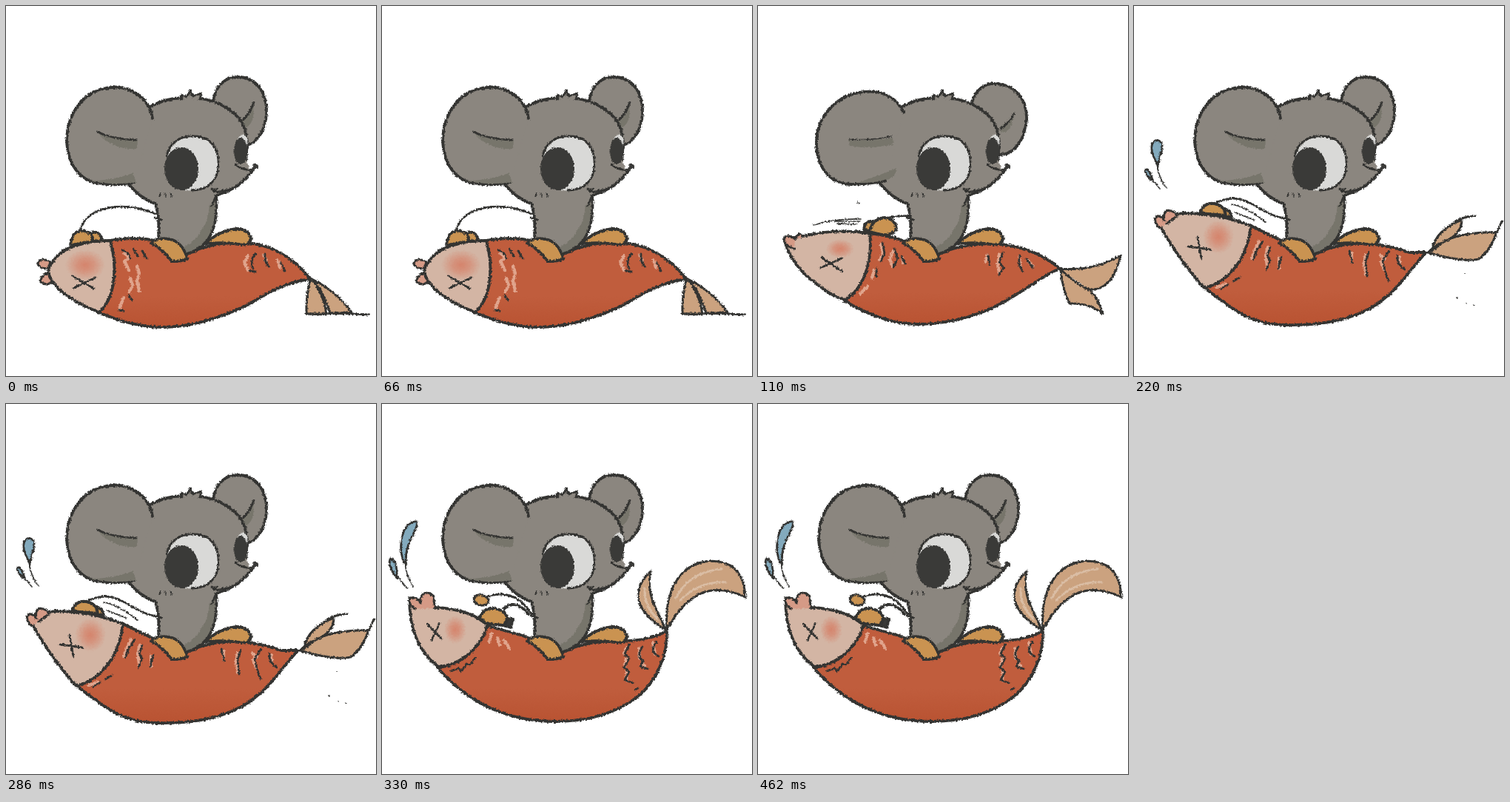
Write an HTML page that moves like this. It is 500x500 px and loops after 550 ms.

```html
<!DOCTYPE html>
<html lang="en">
<head>
<meta charset="utf-8">
<title>Mouse riding a fish</title>
<style>
  html, body { margin: 0; width: 100%; height: 100%; overflow: hidden; background: #fff; }
  svg { display: block; width: 100vw; height: 100vh; }
  path { fill: none; stroke: #343432; stroke-width: 3.8; stroke-linecap: round; stroke-linejoin: round; }
  path.thin { stroke-width: 2.8; }
  path.fine { stroke-width: 1.7; }
  path.grey { fill: #8b867f; }
  path.flat { stroke: none; }
  path.shade { fill: #77756b; stroke: none; }
  path.red { fill: url(#scales); }
  path.face { fill: #d3b5a4; }
  path.lip { fill: #d59a86; stroke-width: 3; }
  path.gold, ellipse.gold { fill: #ca9351; }
  ellipse.gold { stroke: #343432; stroke-width: 3.2; }
  path.tail { fill: #cba27f; stroke-width: 3; }
  path.drop { fill: #83aabd; stroke-width: 2.8; }
  path.mark { stroke: #e0a48c; stroke-width: 4.2; }
  path.streak { stroke: #dabda4; stroke-width: 3; }
  .ink { fill: #3a3a38; }
  .white { fill: #d9d9d7; }

  .pose, .earsB { visibility: hidden; }
  .pose, .earsA, .earsB { animation: 550ms step-end infinite; }
  .flatPose { animation-name: first; }
  .lowPose, .earsB { animation-name: second; }
  .bentPose { animation-name: third; }
  .highPose { animation-name: fourth; }
  .earsA { animation-name: exceptSecond; }
  @keyframes first { 0% { visibility: visible } 20%, 100% { visibility: hidden } }
  @keyframes second { 0% { visibility: hidden } 20% { visibility: visible } 40%, 100% { visibility: hidden } }
  @keyframes third { 0% { visibility: hidden } 40% { visibility: visible } 60%, 100% { visibility: hidden } }
  @keyframes fourth { 0% { visibility: hidden } 60%, 100% { visibility: visible } }
  @keyframes exceptSecond { 0% { visibility: visible } 20% { visibility: hidden } 40%, 100% { visibility: visible } }
</style>
</head>
<body>
<svg viewBox="0 0 500 500">
  <defs>
    <filter id="rough" filterUnits="userSpaceOnUse" x="0" y="0" width="500" height="500" color-interpolation-filters="sRGB">
      <feTurbulence type="fractalNoise" baseFrequency=".4" numOctaves="2" seed="4"/>
      <feDisplacementMap in="SourceGraphic" scale="4" xChannelSelector="R" yChannelSelector="G"/>
    </filter>
    <radialGradient id="blush">
      <stop offset="0" stop-color="#d5846c"/>
      <stop offset=".4" stop-color="#d5846c" stop-opacity=".7"/>
      <stop offset="1" stop-color="#d5846c" stop-opacity="0"/>
    </radialGradient>
    <linearGradient id="scales" x2="0" y2="1">
      <stop offset=".65" stop-color="#c05d3d"/>
      <stop offset="1" stop-color="#b95332"/>
    </linearGradient>
  </defs>

  <g filter="url(#rough)">
    <g class="pose flatPose">
      <path class="tail" d="M411 370Q405 394 406 416L432 417Q434 402 416 372ZM416 372Q428 384 438 415L468 415Q444 383 411 368"/>
      <path class="thin" d="M406 416Q450 415 490 417"/>
      <path class="lip" d="M60 346Q47 339 43 347Q44 355 57 355ZM57 361Q46 364 47 373Q54 379 62 373Z"/>
      <path class="red" d="M140 317Q176 311 201 317L245 335Q270 322 310 319C354 319 388 338 411 369C374 374 354 388 324 405Q263 434 211 434C177 434 147 423 125 414C150 393 148 347 140 317Z"/>
      <path class="face" d="M141 317Q102 317 76 332Q59 346 57 360C64 386 101 404 126 414C151 391 149 346 141 317Z"/>
      <ellipse cx="107" cy="350" rx="27" ry="21" fill="url(#blush)"/>
      <path class="thin" d="M90 365L119 382M121 367L91 381"/>
      <path class="mark" d="M160 334L166 340 160 345 166 357M177 352L180 361 177 372 180 385M168 368L171 377 167 386M159 394L153 409M327 338L322 347 327 357M348 336L352 346M367 343L370 353"/>
      <path class="thin" d="M157 330Q166 332 168 341M172 328L178 338M184 331L190 341M166 391L170 397M153 411L159 412M337 335Q329 343 334 355M350 335Q349 345 355 352M371 346L377 358M329 358L337 359"/>
      <path class="thin" d="M100 302C111 269 162 262 209 284"/>
      <path class="gold" d="M87 323Q90 301 106 304Q118 306 117 318ZM114 307Q127 302 130 317L117 318"/>
    </g>

    <g class="pose lowPose">
      <path class="tail" d="M408 355Q453 359 490 337Q486 356 475 372Q462 385 446 383Q426 373 408 355ZM409 357Q412 385 421 402Q448 401 466 416Q458 391 446 382"/>
      <path class="red" d="M150 307Q179 310 201 319L245 335Q269 323 311 321C353 322 384 334 408 355C384 363 355 391 310 411Q262 430 216 430C177 430 143 414 116 398C143 383 155 345 150 307Z"/>
      <path class="face" d="M151 307Q104 300 61 311L35 315Q46 353 80 376Q99 392 117 397C143 383 155 345 151 307Z"/>
      <path class="lip" d="M49 328Q35 324 35 313Q43 308 50 315M50 315Q55 304 61 311L70 309"/>
      <ellipse cx="111" cy="328" rx="19" ry="13" fill="url(#blush)"/>
      <path class="thin" d="M86 340L114 359M113 341L84 354"/>
      <path class="mark" d="M166 321L169 333 165 343M183 331L178 342 182 352M157 357L154 368M148 379L138 389M195 340L196 347M310 337L307 346M326 335L324 350 326 360M353 339L355 352M365 344L371 352"/>
      <path class="thin" d="M168 320L171 334 166 345M184 328L189 341 183 353M194 339L199 348M160 355L160 365M311 337L313 349M331 333L326 346 332 354 326 363M354 337Q350 349 358 359M363 342L371 353"/>
      <path class="thin" d="M160 301Q165 281 208 284"/>
      <path class="fine" d="M75 296Q106 287 139 288M104 291L137 291M107 294L134 295M135 265L136 267"/>
      <path class="gold" d="M143 303Q144 289 156 291L153 304Z"/>
      <path class="gold" d="M151 305Q154 287 171 286Q187 288 187 302Q179 312 163 308Z"/>
    </g>

    <g class="pose bentPose">
      <path class="tail" d="M402 331Q408 302 443 289Q443 309 418 319ZM397 333Q428 304 490 306Q482 330 466 342Q445 347 397 333Z"/>
      <path class="thin" d="M434 291Q447 284 461 284M490 306L497 291"/>
      <path class="red" d="M158 297L201 318 245 335Q270 322 309 320Q344 323 372 333L395 333C375 352 364 375 341 393C304 426 251 432 204 431C154 431 126 403 95 381C134 370 150 335 158 297Z"/>
      <path class="face" d="M158 297Q116 280 65 280L29 286Q59 342 95 381C131 372 153 339 158 297Z"/>
      <path class="lip" d="M35 300Q25 291 30 284Q39 283 41 290Q39 277 46 276Q56 277 58 284L44 294"/>
      <ellipse cx="114" cy="312" rx="21" ry="23" fill="url(#blush)"/>
      <path class="thin" d="M73 325L103 329M86 313L91 341"/>
      <path class="mark" d="M169 318L164 329 159 341M181 326L178 337 180 352M196 340L196 354M124 376L112 380M294 333L294 345M313 336L311 348 313 363M333 337L339 341 334 345 338 356M359 339L359 349"/>
      <path class="thin" d="M174 318L166 330 161 343M184 326L180 338 184 344 179 356M199 339L195 355M143 367L134 372M127 376L118 382M291 331L295 347M317 333L313 345 315 365M344 332L336 344 340 361 344 371M356 337Q355 350 366 356"/>
      <path class="thin" d="M108 267C154 244 165 285 212 288"/>
      <path class="fine" d="M132 268Q154 272 177 292M137 279L162 289"/>
      <path class="gold" d="M89 280Q94 265 108 267Q122 269 124 283ZM120 274Q130 275 132 285L124 284"/>
      <path class="drop" d="M32 215Q18 190 28 182Q39 180 38 192ZM25 236Q12 226 16 220Q23 223 25 236Z"/>
      <path class="fine" d="M31 215Q34 234 44 246M25 235L35 247M436 394L437 395M448 401L449 402M459 404L460 405M447 361L448 361"/>
    </g>

    <g class="pose highPose">
      <path class="tail" d="M383 305C344 281 334 254 363 226C356 260 373 278 383 305ZM385 305C380 235 418 207 455 213C482 217 490 239 491 261C447 240 413 253 385 305Z"/>
      <path class="streak" d="M355 249Q354 273 373 291M397 263Q414 227 459 223M403 265Q429 239 465 241"/>
      <path class="red" d="M140 299L190 313 245 335Q270 322 310 320Q362 322 385 306C386 340 371 375 345 396C310 422 270 429 235 429C170 429 116 404 75 356C110 354 134 326 140 299Z"/>
      <path class="face" d="M142 299Q120 277 71 275L37 263Q37 326 76 355C108 353 136 326 142 299Z"/>
      <path class="lip" d="M45 277Q34 270 38 262Q48 260 52 269Q51 255 62 255Q72 258 70 266L72 276"/>
      <ellipse cx="99" cy="305" rx="15" ry="19" fill="url(#blush)"/>
      <path class="thin" d="M61 297L80 317M78 296L67 319"/>
      <path class="mark" d="M148 310L145 321M156 316L159 326M165 319L172 330M331 329L327 337M330 344L328 355M331 362L330 374M347 330L348 343M352 349L355 356M366 322L369 338"/>
      <path class="thin" d="M93 361L104 357 107 361 115 351 119 352 126 343M334 325L328 338 334 344 327 356 334 362 328 373 339 377M352 328Q343 340 353 347L349 355 360 358M371 322Q360 334 374 341M342 386L346 384"/>
      <path class="thin" d="M140 261Q179 247 202 284"/>
      <path d="M165 276Q181 263 198 284"/>
      <ellipse class="gold" cx="134" cy="265" rx="10" ry="7" transform="rotate(15 134 265)"/>
      <path class="gold" d="M132 290Q135 276 151 276Q169 279 169 291L164 299 142 297Z"/>
      <path class="ink" d="M169 291L177 290 174 302 166 300Z"/>
      <path class="drop" d="M29 213C20 184 31 157 47 159C50 171 31 183 32 216ZM20 235Q7 219 11 209Q21 210 20 235Z"/>
      <path class="fine" d="M31 213Q32 231 42 247M20 232L34 249"/>
    </g>

    <g class="earsA">
      <path class="grey" d="M280 129C283 107 297 95 316 96C341 98 353 120 352 146C350 170 339 184 326 188"/>
      <path class="shade" d="M334 133Q337 157 325 164L317 157Z"/>
      <path class="thin" d="M335 130Q329 147 318 156"/>
    </g>
    <g class="earsB">
      <path class="grey" d="M289 130C295 112 307 104 322 105C350 107 364 129 363 154C360 181 347 201 326 201"/>
      <path class="shade" d="M345 148Q344 169 330 171L326 165Z"/>
      <path class="thin" d="M346 146Q339 158 328 166"/>
    </g>

    <!-- head and torso -->
    <path class="grey flat" d="M165 238L196 137Q216 124 241 124C280 122 308 139 319 158Q328 176 325 207L328 219 333 222Q319 242 300 250L284 257Q287 296 272 317Q260 331 244 335L207 316 203 267Q180 258 165 238Z"/>
    <path class="shade" d="M282 261Q285 306 267 322Q255 335 240 333L236 328Q258 318 265 301Q272 295 275 269Z"/>
    <path d="M195 136Q217 124 241 124C281 122 308 140 319 158Q327 174 326 192M333 222Q319 242 300 250L284 256Q287 296 272 317Q260 331 244 335M165 240Q181 260 202 267Q208 287 206 314"/>
    <path class="thin" d="M326 190L325 208M284 256L278 270M201 286L210 289"/>
    <path class="grey thin" d="M238 126L237 120 244 123 249 114 252 122 264 118 262 126"/>
    <ellipse class="white" cx="252" cy="213" rx="35" ry="37"/>
    <path class="thin" d="M217 203C221 182 239 175 255 176C279 177 288 194 287 216C286 237 272 249 251 249"/>
    <ellipse class="ink" cx="237" cy="220" rx="23" ry="29"/>
    <path class="white flat" d="M312 181Q321 166 326 180L325 192Z"/>
    <ellipse class="ink" cx="317" cy="196" rx="9" ry="18"/>
    <path class="thin" d="M310 214Q320 223 333 221L337 216M278 247Q281 253 292 250L304 248M280 249L286 247"/>
    <ellipse class="ink" cx="337" cy="217" rx="4" ry="3.500"/>
    <path class="fine" d="M209 252L207 258M215 253L216 257M222 253L224 257"/>

    <g class="earsA">
      <path class="grey" d="M198 152C194 124 168 109 145 110C108 111 83 142 82 181C83 214 99 236 127 240Q153 243 173 239"/>
      <path class="shade" d="M124 171Q145 181 178 181L177 193Q144 195 124 171ZM112 236Q145 236 171 226L176 238Q143 243 112 236Z"/>
      <path class="thin" d="M124 170Q143 180 176 181"/>
    </g>
    <g class="earsB">
      <path class="grey" d="M197 144C187 123 168 114 145 116C107 119 78 148 79 188C80 221 100 241 127 241Q151 241 172 236"/>
      <path class="shade" d="M122 181Q151 183 182 178L183 187Q151 194 124 189ZM133 239Q165 229 187 219L184 230Q165 240 133 239Z"/>
      <path class="fine" d="M124 180Q154 182 181 176"/>
    </g>

    <path class="gold" d="M196 320Q207 311 225 316Q240 322 245 342Q233 346 224 345Q213 330 196 320Z"/>
    <path class="gold" d="M270 321Q288 303 313 301Q329 302 331 315Q329 325 315 322Q295 319 270 321Z"/>
  </g>
</svg>
</body>
</html>
```
